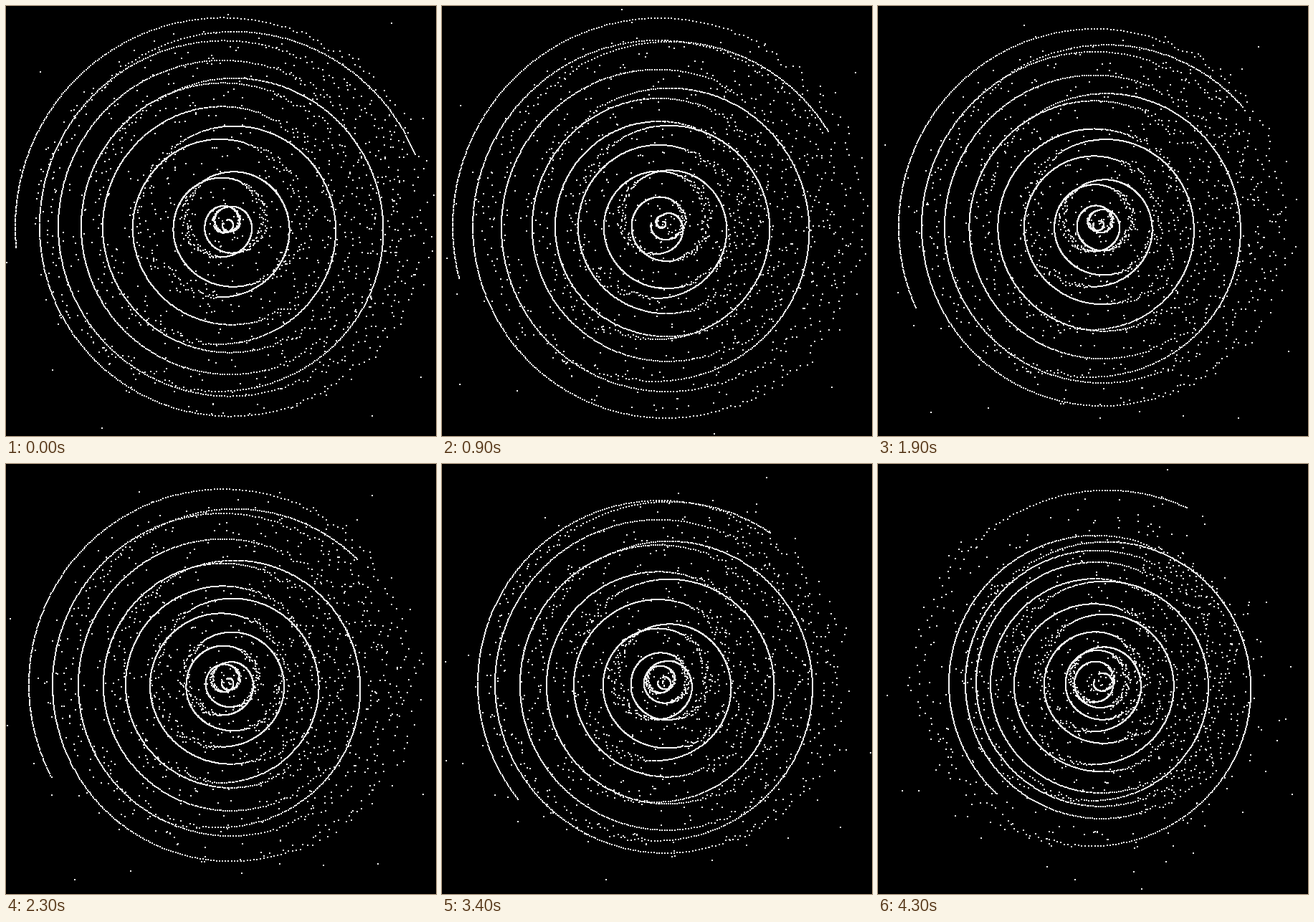
Write an HTML page with a canvas that moves like this. It is 600x600 px and loops after 4.4 s.

```html
<!DOCTYPE html>
<html>
<head>
<meta charset="utf-8">
<style>
html, body { margin: 0; height: 100%; overflow: hidden; background: #000; }
canvas { display: block; }
</style>
</head>
<body>
<canvas id="stage" width="600" height="600"></canvas>
<script>
const ctx = document.getElementById('stage').getContext('2d');
const CX = 308, CY = 303, STEPS = 44, STEP_MS = 100, RAD = Math.PI / 180;

// Steps at which the radius of every spiral turn is known.
const KEYS = [0, 9, 15, 23, 29, 34, 43];

// dir: winding direction inward, axis: angle where turn radii are measured,
// start: angle of the outer end, dense: angle where dots crowd together.
const ARMS = [
  { dir: 1, axis: 180, start: 173.4, drift: 0.96, dense: 180, turns: [
    [295, 261, 235, 203, 173, 131, 74, 30, 5],
    [293, 265, 225, 182, 150, 118, 82, 43, 16],
    [282, 251, 223, 189, 140, 101, 67, 31, 8],
    [276, 243, 207, 172, 141, 107, 56, 29, 6],
    [272, 238, 202, 166, 127, 92, 58, 31, 6],
    [258, 234, 199, 162, 124, 83, 44, 26, 6],
    [209, 186, 171, 151, 118, 76, 46, 34, 6]] },
  { dir: -1, axis: -90, start: -20, drift: 1, dense: -10, turns: [
    [267, 202, 135, 71, 22, 4],
    [253, 188, 136, 73, 11, 2],
    [257, 193, 118, 52, 10, 2],
    [240, 168, 115, 68, 26, 3],
    [238, 182, 131, 84, 32, 5],
    [250, 195, 142, 79, 27, 5],
    [266, 194, 139, 93, 47, 10]] }
];

function seeded(seed) {
  return () => {
    seed = (seed * 1664525 + 1013904223) % 4294967296;
    return seed / 4294967296;
  };
}

const mix = (a, b, k) => a + (b - a) * k;

const random = seeded(7);
const dust = Array.from({ length: 620 }, () => ({
  angle: (random() + random() + random() - 1.5) * 240 + 15,
  radius: 275 * Math.pow(random(), 0.6)
}));
const strays = Array.from({ length: 22 }, () => ({
  angle: random() * 360,
  radius: 290 + 90 * random()
}));

function dot(angle, radius) {
  const x = CX + radius * Math.cos(angle * RAD);
  const y = CY + radius * Math.sin(angle * RAD);
  ctx.fillRect(Math.round(x - 1), Math.round(y - 1), 2, 2);
}

function turnRadii(turns, step) {
  let i = 0;
  while (i < KEYS.length - 2 && step > KEYS[i + 1]) i++;
  const k = (step - KEYS[i]) / (KEYS[i + 1] - KEYS[i]);
  return turns[i].map((r, n) => mix(r, turns[i + 1][n], k));
}

function drawArm(arm, step) {
  const radii = turnRadii(arm.turns, step);
  const jitter = seeded(31);
  let angle = arm.start - arm.drift * step;
  for (;;) {
    const turn = (angle - arm.axis) * arm.dir / 360;
    if (turn >= radii.length - 1) break;
    const i = Math.max(0, Math.floor(turn));
    const radius = mix(radii[i], radii[i + 1], turn - i);
    const facing = Math.cos((angle - arm.dense) * RAD);
    const spread = 22 * Math.max(0, -facing - 0.25) * Math.min(1, radius / 120);
    dot(angle, radius + (jitter() - 0.5) * 2 * spread);
    angle += arm.dir * 0.46 * Math.exp(0.72 * (1 - facing));
  }
}

function draw(step) {
  ctx.fillStyle = '#000';
  ctx.fillRect(0, 0, 600, 600);
  ctx.fillStyle = '#f4f4f4';
  for (const arm of ARMS) drawArm(arm, step);
  for (const d of dust) dot(d.angle - step, (d.radius - 0.8 * step + 275) % 275);
  for (const s of strays) dot(s.angle - step, s.radius - 0.9 * step);
}

const begin = performance.now();
function tick() {
  draw(Math.floor((performance.now() - begin) / STEP_MS) % STEPS);
  requestAnimationFrame(tick);
}
tick();
</script>
</body>
</html>
```
